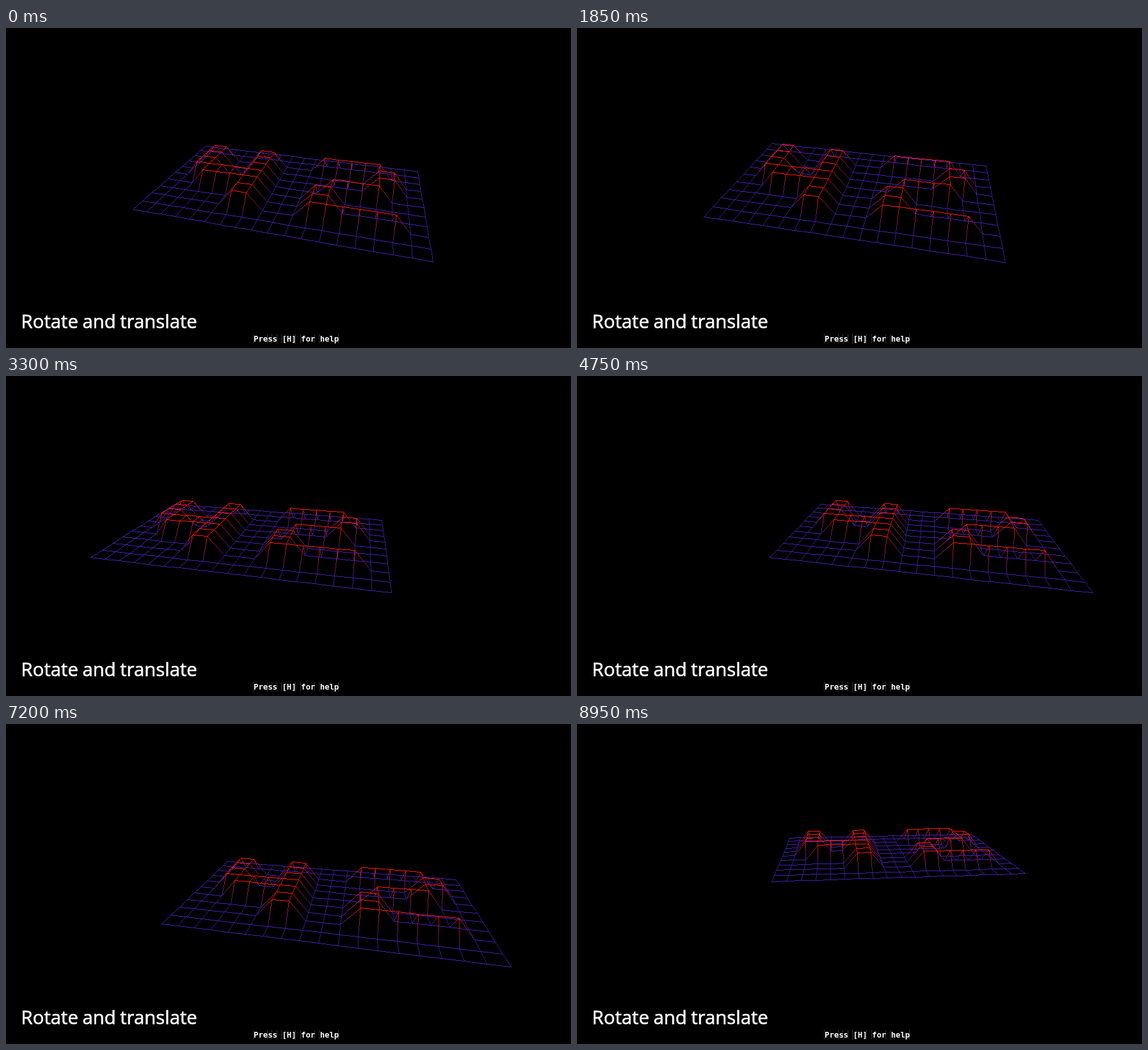
Animation of 883 by 500 pixels, one loop 9000 ms. Source, as an HTML page with a canvas:

```html
<!DOCTYPE html>
<html lang="en">
<head>
<meta charset="utf-8">
<title>Wireframe</title>
<style>
  html, body { margin: 0; width: 100%; height: 100%; overflow: hidden; background: #000; }
  canvas, svg { position: absolute; left: 0; top: 0; width: 883px; height: 500px; }
  .title { font: 29.3px "Open Sans", "Noto Sans", sans-serif; word-spacing: -1px;
           fill: #fff; stroke: #fff; stroke-width: .6px; }
  .help { font: bold 12.3px "DejaVu Sans Mono", monospace; fill: #fff; white-space: pre; }
</style>
</head>
<body>
<canvas id="mesh" width="883" height="500"></canvas>
<svg viewBox="0 0 883 500">
  <path id="bars" stroke="#333" fill="none"/>
  <text class="title" x="23.6" y="469">Rotate and translate</text>
  <text class="help" x="387" y="490">Press [H] for help</text>
</svg>
<script>
const W = 883, H = 500, LOOP = 9000, STEP = 50;
const COLS = 19, ROWS = 11, PEAK = 1.2;
const FOCAL = 500, CX = 442.3, CY = 250.5;
const LOW = [66, 32, 168], HIGH = [255, 26, 8], STEEP_SHADE = 0.82;
const TURN = 81, SLIDE = 17.5, ZOOM = 26;   // degrees or cells per second

// The digits 4 and 2, drawn with a pen two cells wide.
const strokes = ['2,2 2,5 6,5', '3,6 6,6', '6,2 6,8', '11,2 14,2 15,3 15,4 14,5 12,5 11,6 11,8 15,8'];
const raised = new Set();
for (const stroke of strokes) {
  const pts = stroke.split(' ').map(p => p.split(',').map(Number));
  for (let i = 1; i < pts.length; i++) {
    const [x0, y0] = pts[i - 1], [x1, y1] = pts[i];
    const n = Math.max(Math.abs(x1 - x0), Math.abs(y1 - y0));
    for (let k = 0; k <= n; k++) {
      const x = x0 + (x1 - x0) * k / n, y = y0 + (y1 - y0) * k / n;
      raised.add(x + y * COLS).add(x + 1 + y * COLS);
    }
  }
}

// Moves from stop to stop at a constant speed, like a held key.
function sweep(t, start, speed, ...stops) {
  let left = Math.max(0, t - start) / 1000 * speed;
  for (let i = 1; i < stops.length; i++) {
    const way = stops[i] - stops[i - 1];
    if (left < Math.abs(way)) return stops[i - 1] + Math.sign(way) * left;
    left -= Math.abs(way);
  }
  return stops[stops.length - 1];
}

function camera(t) {
  const drift = Math.min(Math.max(t - 2900, 0), 700) / 1000;
  return {
    yaw: t < 7500 ? sweep(t, 0, TURN, 14.3, -5.8, 32.6, 4.7, 11.9)
                  : sweep(t, 7570, TURN, 11.9, -31, -10, -31, -4.3),
    pitch: sweep(t, 1155, TURN, 32, 62, 20, 56, 25.4),
    roll: sweep(t, 1000, 1, 0.4, 0),
    x: t < 3740 ? -15.6 * drift * drift : sweep(t, 3740, SLIDE, -7.7, 7.1, 2.55),
    y: t < 6250 ? sweep(t, 4870, SLIDE, 0, -5.6, 2.57, -7.74)
                : sweep(t, 6250, 12, -7.74, 2.3, -2.64),
    z: sweep(t, 5400, ZOOM, 22.6, 18.2, 35.7, 15.9, 27)
  };
}

function projector(cam) {
  const [[sa, ca], [sp, cp], [sr, cr]] = [cam.yaw, cam.pitch, cam.roll]
    .map(deg => deg * Math.PI / 180).map(a => [Math.sin(a), Math.cos(a)]);
  return (u, v, level) => {
    const near = u * sa + v * ca, h = level * PEAK;
    const scale = FOCAL / (cam.z - near * cp - h * sp);
    const x = (cam.x + u * ca - v * sa) * scale;
    const y = (cam.y + near * sp - h * cp) * scale;
    return { x: Math.round(CX + x * cr - y * sr), y: Math.round(CY + x * sr + y * cr), level };
  };
}

const ctx = document.getElementById('mesh').getContext('2d');
const image = ctx.createImageData(W, H);
const pixels = image.data;

function line(a, b) {
  const dx = b.x - a.x, dy = b.y - a.y;
  const n = Math.max(Math.abs(dx), Math.abs(dy), 1);
  const shade = Math.abs(dy) > Math.abs(dx) ? STEEP_SHADE : 1;
  for (let i = 0; i <= n; i++) {
    const k = i / n, x = Math.round(a.x + dx * k), y = Math.round(a.y + dy * k);
    if (x < 0 || x >= W || y < 0 || y >= H) continue;
    const level = a.level + (b.level - a.level) * k, at = (y * W + x) * 4;
    for (let c = 0; c < 3; c++) {
      const value = shade * (LOW[c] + (HIGH[c] - LOW[c]) * level);
      if (c || value >= pixels[at]) pixels[at + c] = value;
    }
    pixels[at + 3] = 255;
  }
}

function draw(t) {
  const project = projector(camera(t));
  const point = (c, r) => project(c - (COLS - 1) / 2, r - (ROWS - 1) / 2, +raised.has(c + r * COLS));
  pixels.fill(0);
  for (let r = 0; r < ROWS; r++) {
    for (let c = 0; c < COLS; c++) {
      const p = point(c, r);
      if (r + 1 < ROWS) line(p, point(c, r + 1));
      if (c + 1 < COLS) line(p, point(c + 1, r));
    }
  }
  ctx.putImageData(image, 0, 0);
}

// Faint edges between some of the help text's character cells.
document.getElementById('bars').setAttribute('d',
  [0, 3, 4, 5, 6, 9, 10, 13, 14, 18].map(i => `M${Math.floor(387 + i * 7.4) - 0.5} 478v15`).join(''));

const start = performance.now();
function tick() {
  const t = (performance.now() - start) % LOOP;
  draw(Math.floor(t / STEP) * STEP);
  requestAnimationFrame(tick);
}
tick();
</script>
</body>
</html>
```
